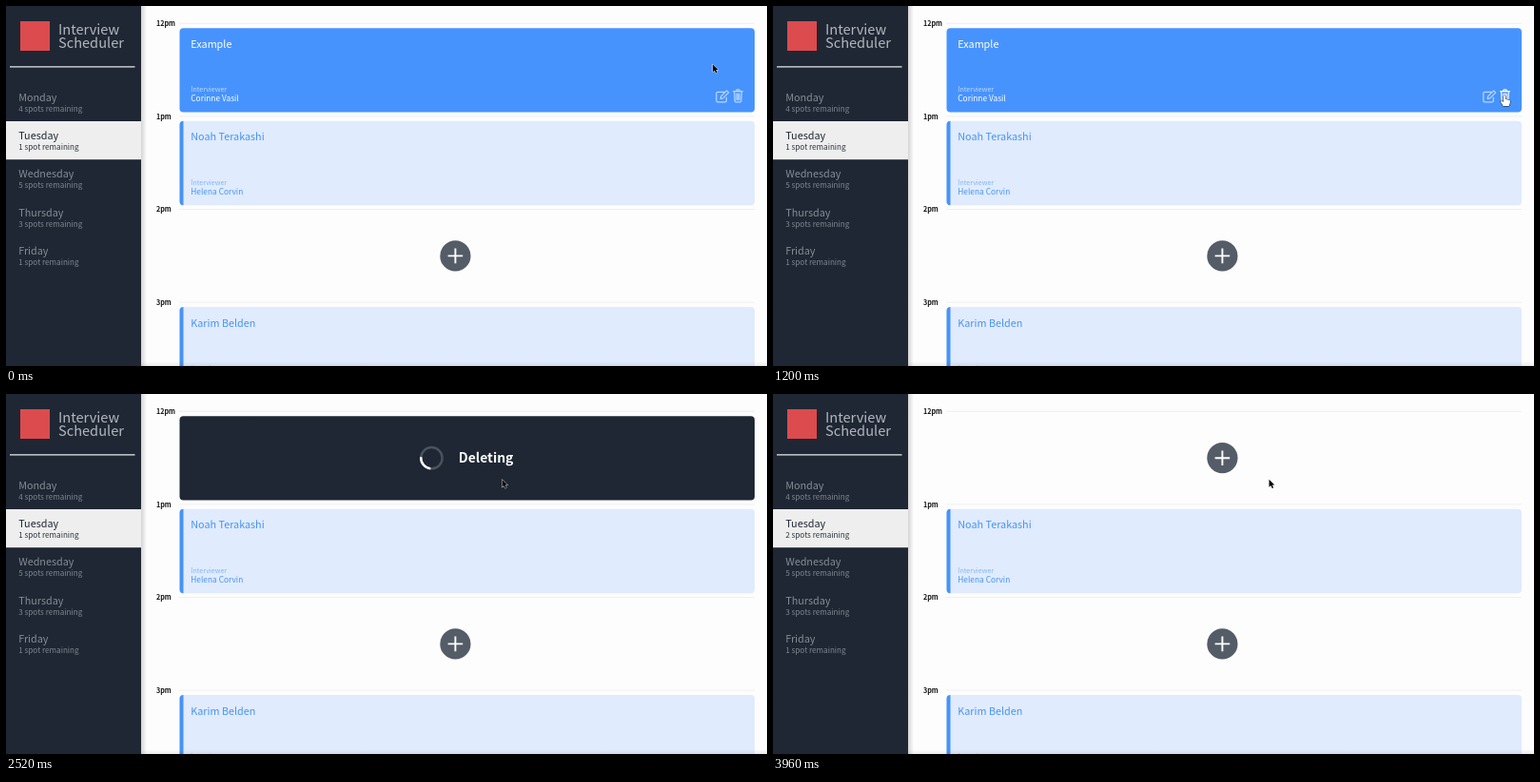
An HTML page for the animation above (4000 ms loop, 800 by 378 pixels).

```html
<!DOCTYPE html>
<html lang="en">
<head>
<meta charset="utf-8">
<title>Interview Scheduler</title>
<style>
  html, body { margin: 0; width: 100%; height: 100%; overflow: hidden; background: #fdfdfd; }
  svg { display: block; width: 100vw; height: 100vh; }
  text { font: 400 10.8px "Noto Sans CJK JP", "Noto Sans CJK SC", "Noto Sans CJK", "Open Sans", sans-serif; }
  .brand { font-size: 14.6px; font-weight: 300; fill: #b3b8be; }
  .spots { font-size: 8.15px; font-weight: 300; }
  .hour { font-size: 7.2px; font-weight: 700; fill: #111; }
  .label { font-size: 7.1px; font-weight: 300; }
  .person { font-size: 8.35px; }
  .message { font-size: 13.9px; font-weight: 700; }
  .middle { text-anchor: middle; }
  .icon { fill: none; stroke: #b9d6ff; stroke-width: 1.2; stroke-linejoin: round; stroke-linecap: round; }
</style>
</head>
<body>
<svg id="stage" viewBox="0 0 800 378"></svg>
<script>
const LOOP = 4000;
const ROW = 97.6;
const ASK = 1260, HOVER = 1760, DELETE = 2520, DONE = 3700;
const stage = document.getElementById('stage');

const text = (x, y, cls, fill, content, id = '') =>
  `<text x="${x}" y="${y}" class="${cls}" fill="${fill}"${id && ` id="${id}"`}>${content}</text>`;
const box = (x, y, w, h, r, fill, extra = '') =>
  `<rect x="${x}" y="${y}" width="${w}" height="${h}" rx="${r}" fill="${fill}" ${extra}/>`;
const group = (id, content) => `<g id="${id}">${content}</g>`;

function day(index, name, spots) {
  const y = 99.7 + index * 40.35;
  const selected = index === 1;
  return (selected ? box(0, 121, 142, 40.2, 0, '#eeeeee') : '') +
    text(13.2, y, '', selected ? '#1f2733' : '#858c95', name) +
    text(13.2, y + 11, 'spots', selected ? '#2b323c' : '#7e8690', spots, selected ? 'spots' : '');
}

function hour(index, label) {
  const y = 18.3 + index * ROW;
  return `<path d="M182 ${y}H787" stroke="#ececec" stroke-width=".8"/>` +
    text(158, y + 2.8, 'hour', '', label);
}

function details(top, title, person, colors) {
  return text(194.3, top + 20.6, '', colors[0], title) +
    text(194.3, top + 66.7, 'label', colors[1], 'Interviewer') +
    text(194.3, top + 77, 'person', colors[0], person);
}

function booking(row, title, person) {
  const top = 23.2 + row * ROW;
  return box(182.5, top, 604.5, 88.4, 4, '#e0ebfd') +
    `<path d="M186.5 ${top}v88.4a4 4 0 0 1-4-4v-80.4a4 4 0 0 1 4-4z" fill="#4793f7"/>` +
    details(top, title, person, ['#4793f2', '#83b5f5']);
}

function addButton(row) {
  const y = 67.2 + row * ROW;
  return `<circle cx="472.4" cy="${y}" r="16.1" fill="#545c67"/>` +
    `<path d="M464.6 ${y}h15.6m-7.8-7.8v15.6" stroke="#fff" stroke-width="1.9"/>`;
}

const card = (fill, extra) => box(182.5, 23.2, 604.5, 88.2, 4, fill, extra);
const outline = 'stroke="#dd4d53" stroke-width="1"';

const editIcon = `<path class="icon" d="M755.3 90.3H748.2Q746.8 90.3 746.8 91.7V99.4Q746.8 100.8 748.2 100.8H755.9Q757.3 100.8 757.3 99.4V96.2M751.2 97.3L751.6 94.8L757.6 88.8L759.7 90.9L753.7 96.9Z"/>`;
const trashIcon = `<path id="trash" class="icon" d="M764.6 89.6H774.4M767.4 89.4L768.2 87.8H770.8L771.6 89.4M765.6 89.8L766.1 99.6Q766.2 100.8 767.4 100.8H771.6Q772.8 100.8 772.9 99.6L773.4 89.8M767.9 92V98.6M769.5 92V98.6M771.1 92V98.6"/>`;

stage.innerHTML = `
  <defs>
    <linearGradient id="sideShade"><stop stop-color="#000" stop-opacity=".16"/><stop offset="1" stop-color="#000" stop-opacity="0"/></linearGradient>
    <linearGradient id="footShade" x2="0" y2="1"><stop stop-color="#000" stop-opacity="0"/><stop offset="1" stop-color="#000" stop-opacity=".07"/></linearGradient>
  </defs>` +
  box(0, 0, 800, 378, 0, '#fdfdfd') +
  ['12pm', '1pm', '2pm', '3pm'].map((label, i) => hour(i, label)).join('') +
  booking(1, 'Noah Terakashi', 'Helena Corvin') +
  addButton(2) +
  booking(3, 'Karim Belden', 'Helena Corvin') +
  group('show', card('#4793fe') +
    details(23.2, 'Example', 'Corinne Vasil', ['#ffffff', '#bcd7ff']) + editIcon + trashIcon) +
  group('confirm', card('#fadde0', outline) +
    text(484.5, 48.2, 'message middle', '#dc3a41', 'Are you sure you would like to delete') +
    box(416.5, 85, 64, 15.6, 7.8, 'none', outline) +
    text(448.4, 97, 'middle', '#dc3a41', 'Cancel') +
    box(488.5, 85, 64.5, 15.6, 7.8, 'none', outline + ' id="button"') +
    text(520.8, 97, 'middle', '#dc3a41', 'Confirm', 'buttonText')) +
  group('deleting', card('#1f2734') +
    '<circle cx="447.4" cy="67.2" r="11.2" fill="none" stroke="#fff" stroke-opacity=".2" stroke-width="2.4"/>' +
    '<path id="spinner" d="M7.92-7.92A11.2 11.2 0 0 1 7.92 7.92" fill="none" stroke="#fff" stroke-width="2.4"/>' +
    text(475.8, 72.3, 'message', '#fff', 'Deleting')) +
  group('empty', addButton(0)) +
  box(142, 0, 6, 378, 0, 'url(#sideShade)') +
  box(142, 373, 658, 5, 0, 'url(#footShade)') +
  box(0, 0, 142, 378, 0, '#1f2734') +
  box(15, 16, 31, 31, 0, '#dc4b4d') +
  text(55, 29.8, 'brand', '', 'Interview') +
  text(55, 44.4, 'brand', '', 'Scheduler') +
  '<path d="M4 63.9H135.5" stroke="#e9eaec" stroke-width="1.4"/>' +
  day(0, 'Monday', '4 spots remaining') +
  day(1, 'Tuesday', '1 spot remaining') +
  day(2, 'Wednesday', '5 spots remaining') +
  day(3, 'Thursday', '3 spots remaining') +
  day(4, 'Friday', '1 spot remaining') +
  `<g id="cursor" stroke-width=".9" stroke-linejoin="round" paint-order="stroke">
    <path id="arrow" fill="#000" stroke="#fff" d="M0 0V8L1.9 6.3L3.2 9.2L4.6 8.6L3.3 5.8H5.8Z"/>
    <path id="hand" fill="#fff" stroke="#000" d="M-1 .9C-1-.4 1-.4 1 .9V4.2C1.6 3.6 2.7 3.8 2.8 4.6C3.6 4.1 4.5 4.5 4.5 5.2C5.4 4.9 6 5.5 6 6.3C6 8.4 5 9 4.9 11H-1.6C-1.8 9.3-3.7 7.9-4.2 6.3C-4.2 5.4-2.6 5.2-1 6.9Z"/>
  </g>`;

const parts = Object.fromEntries([...stage.querySelectorAll('[id]')].map(el => [el.id, el]));
const show = (name, visible) => parts[name].setAttribute('display', visible ? 'inline' : 'none');

// Pointer stops: time, x, y
const stops = [[0, 743, 61.2], [60, 743, 61.2], [500, 769, 94], [1300, 769, 94],
  [1720, 514.5, 87.6], [1840, 521.5, 89.8], [LOOP, 521.5, 89.8]];

function pointerAt(t) {
  const next = stops.findIndex(stop => stop[0] > t);
  const [t0, x0, y0] = stops[next - 1];
  const [t1, x1, y1] = stops[next];
  const p = (t - t0) / (t1 - t0);
  const eased = p * p * (3 - 2 * p);
  return [x0 + (x1 - x0) * eased, y0 + (y1 - y0) * eased];
}

function draw(t) {
  show('show', t < ASK);
  show('confirm', t >= ASK && t < DELETE);
  show('deleting', t >= DELETE && t < DONE);
  show('empty', t >= DONE);
  parts.spots.textContent = t < DONE ? '1 spot remaining' : '2 spots remaining';

  const overTrash = t >= 400 && t < ASK;
  const overButton = t >= 1680 && t < 2460;
  parts.trash.style.stroke = overTrash ? '#fff' : '';
  parts.button.setAttribute('fill', t >= HOVER ? '#e9403f' : 'none');
  parts.buttonText.setAttribute('fill', t >= HOVER ? '#fff' : '#dc3a41');

  const angle = 140 + (t - DELETE) * 0.36;
  parts.spinner.setAttribute('transform', `translate(447.4 67.2) rotate(${angle})`);

  parts.cursor.setAttribute('transform', `translate(${pointerAt(t)})`);
  show('hand', overTrash || overButton);
  show('arrow', !overTrash && !overButton);
}

const start = performance.now();
function tick() {
  draw((performance.now() - start) % LOOP);
  requestAnimationFrame(tick);
}
tick();
</script>
</body>
</html>
```
